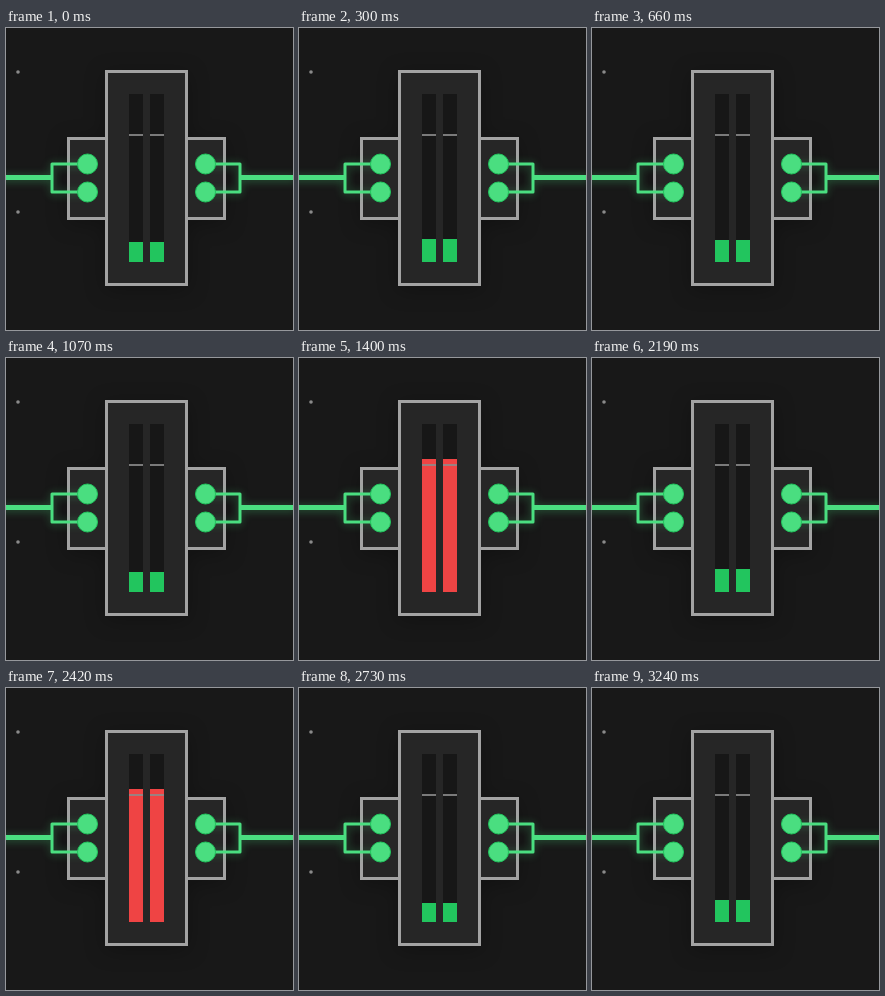
An HTML page that plays this animation: 287x302 px, repeating every 3.29 s.

```html
<!DOCTYPE html>
<html lang="en">
<head>
<meta charset="utf-8">
<title>Level meter</title>
<style>
  html, body { margin: 0; width: 100%; height: 100%; overflow: hidden; background: #181818; }
  svg { display: block; }
  .panel { fill: #262626; stroke: #a3a3a3; stroke-width: 3; }
  .shadow { filter: drop-shadow(0 4px 10px #0004); }
  .cable { fill: none; stroke: #4ade80; filter: drop-shadow(0 1px 4px #4ade8066); }
  .port { fill: #4ade80; stroke: #22c55e; }
</style>
</head>
<body>
<svg width="287" height="302" viewBox="0 0 287 302">
  <defs>
    <g id="cable" class="cable" stroke-linejoin="round">
      <path d="M-10 149.5H46" stroke-width="5"/>
      <path d="M81 136H46V164H81" stroke-width="3"/>
    </g>
    <g id="ports" class="port">
      <circle cy="136" r="10"/>
      <circle cy="164" r="10"/>
    </g>
  </defs>
  <g fill="#8a8a8a">
    <circle cx="12" cy="44" r="1.8"/>
    <circle cx="12" cy="184" r="1.8"/>
  </g>
  <g class="shadow">
    <rect class="panel" x="62.5" y="110.5" width="156" height="80"/>
    <rect class="panel" x="100.5" y="43.5" width="80" height="213"/>
  </g>
  <use href="#cable"/>
  <use href="#cable" transform="translate(280) scale(-1 1)"/>
  <use href="#ports" x="81.5"/>
  <use href="#ports" x="199.5"/>
  <path d="M123 66h14v168h-14zM144 66h14v168h-14z" fill="#171717"/>
  <rect class="bar" x="123" width="14"/>
  <rect class="bar" x="144" width="14"/>
  <path d="M123 107h14M144 107h14" stroke="#8c8c8c" stroke-opacity=".85" stroke-width="2"/>
</svg>
<script>
const LOOP = 3290, BOTTOM = 234, LIMIT = 107, PEAK = 101;
const bars = document.querySelectorAll('.bar');

const clamp = x => Math.min(1, Math.max(0, x));
const ease = x => (1 - Math.cos(Math.PI * clamp(x))) / 2;

// Rises from 0 to 1 at the peak time, then falls back to 0
const pulse = (t, start, peak, end) =>
  ease((t - start) / (peak - start)) * ease((end - t) / (end - peak));

function levelAt(t) {
  const idle = 213 + 2.5 * Math.sin(2.9 + 2 * Math.PI * t / 215);
  const loud = pulse(t, 1130, 1400, 2020) + pulse(t, 2230, 2410, 2720);
  return Math.round(idle + (PEAK - idle) * loud);
}

function draw() {
  const top = levelAt(performance.now() % LOOP);
  for (const bar of bars) {
    bar.setAttribute('y', top);
    bar.setAttribute('height', BOTTOM - top);
    bar.setAttribute('fill', top < LIMIT ? '#ef4444' : '#22c55e');
  }
  requestAnimationFrame(draw);
}
draw();
</script>
</body>
</html>
```
